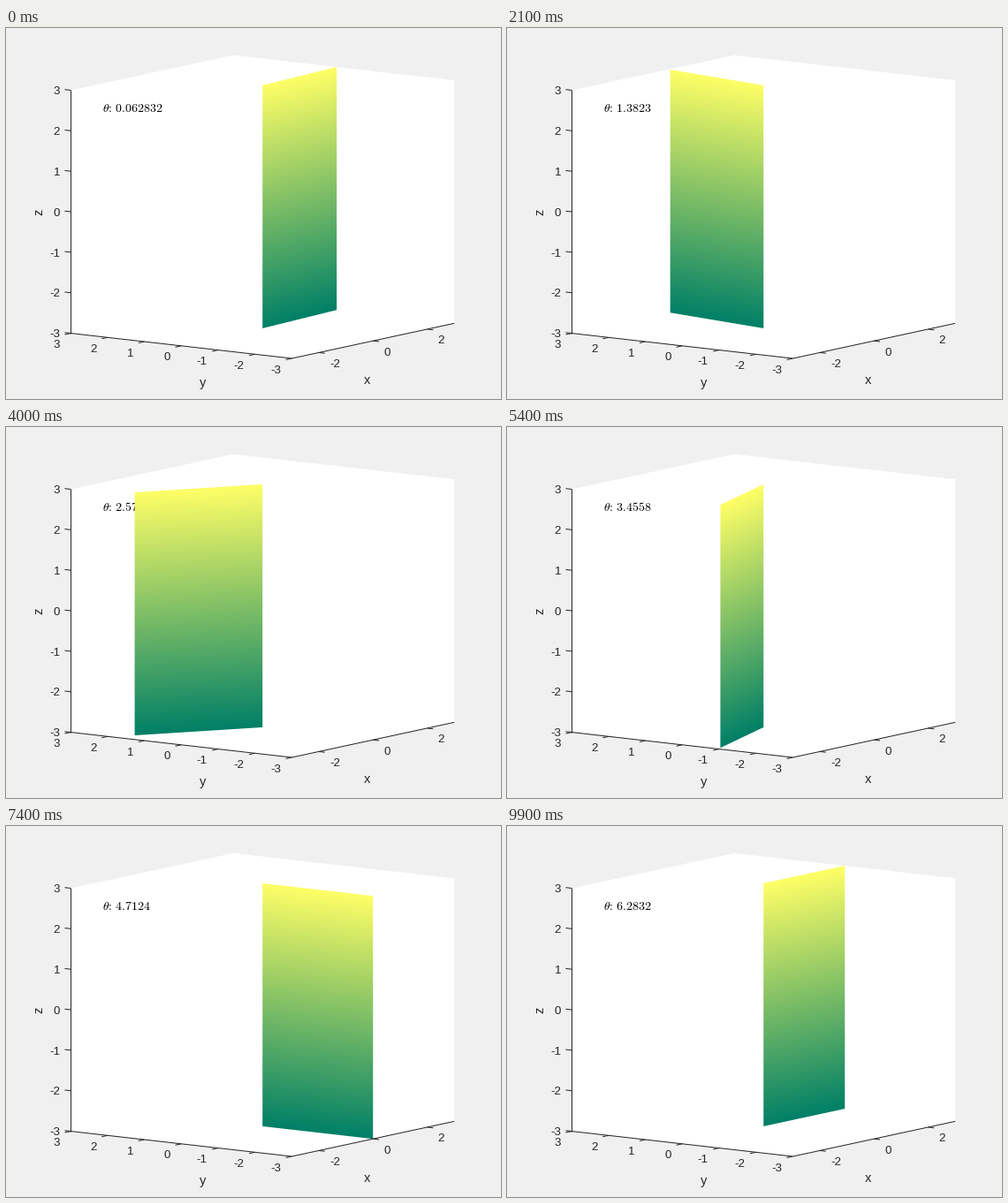
Write a matplotlib script that moves like this. It is 560x420 px and loops after 10 s.

```python
import matplotlib.pyplot as plt
import numpy as np
from matplotlib.animation import FuncAnimation

W, H, DPI = 560, 420, 100
FRAMES = 100
R = 3
INK = "#262626"

# Orthographic projection: screen vectors of the data axes
ORIGIN = np.array([290.2, 202.4])
UX = np.array([30.65, -6.62])
UY = np.array([-41.67, -4.75])
UZ = np.array([0, -45.85])


def project(x, y, z):
    return ORIGIN + x * UX + y * UY + z * UZ


def px(size):
    return size * 72 / DPI


fig = plt.figure(figsize=(W / DPI, H / DPI), dpi=DPI, facecolor="#f0f0f0")
ax = fig.add_axes([0, 0, 1, 1])
ax.set_xlim(0, W)
ax.set_ylim(H, 0)
ax.axis("off")


def line(a, b):
    ax.plot([a[0], b[0]], [a[1], b[1]], color=INK, lw=px(1),
            solid_capstyle="butt", zorder=4)


def tick(p, direction):
    line(p, p + 6.8 * direction / np.hypot(*direction))


def label(x, y, s, ha, size=13.33, **kw):
    ax.text(x, y, s, ha=ha, va="baseline", color=INK, fontsize=px(size),
            family="Liberation Sans", zorder=4, **kw)


def draw_axes():
    outline = [(-R, R, R), (R, R, R), (R, -R, R),
               (R, -R, -R), (-R, -R, -R), (-R, R, -R)]
    ax.fill(*np.transpose([project(*p) for p in outline]), color="white",
            lw=0, zorder=0)
    left, front, right = (project(-R, R, -R), project(-R, -R, -R),
                          project(R, -R, -R))
    line(project(-R, R, R), left)
    line(left, front)
    line(front, right)

    for v in range(-R, R + 1):
        p = project(-R, R, v)
        tick(p, UY)
        label(61, p[1] + 4.7, str(v), "right")
        p = project(-R, v, -R)
        tick(p, -UX)
        label(p[0] - 12.3, p[1] + 16.6, str(v), "right")
    for v in (-2, 0, 2):
        p = project(v, -R, -R)
        tick(p, -UY)
        label(p[0] + 12.3, p[1] + 16.4, str(v), "left")

    label(408.5, 403, "x", "center", 14.67)
    label(222.5, 406, "y", "center", 14.67)
    label(41, 208, "z", "center", 14.67, rotation=90, rotation_mode="anchor")


def sheet(theta):
    """RGBA picture of the half plane at angle theta, with soft edges."""
    hinge = project(0, 0, R)
    tip = project(R * np.cos(theta), R * np.sin(theta), R)
    (x0, y0), (x1, y1) = sorted([tuple(hinge), tuple(tip)])
    cols = np.arange(W)
    rows = np.arange(H)[:, None] + 0.5
    across = np.clip((cols + 0.5 - x0) / (x1 - x0), 0, 1)
    top = y0 + across * (y1 - y0)
    height = -2 * R * UZ[1]

    t = np.clip(1 - (rows - top) / height, 0, 1)
    cover_x = np.clip(np.minimum(cols + 1, x1) - np.maximum(cols, x0), 0, 1)
    cover_y = np.clip(np.minimum(rows - top, top + height - rows) + 0.5, 0, 1)
    # the "summer" colour ramp
    return np.dstack([t, 0.5 + t / 2, np.full_like(t, 0.4), cover_x * cover_y])


draw_axes()
plane = ax.imshow(np.zeros((H, W, 4)), extent=(0, W, H, 0), aspect="auto",
                  interpolation="nearest", zorder=2)
readout = ax.text(108.8, 95.3, "", color="black", fontsize=px(13.9),
                  math_fontfamily="cm", ha="left", va="baseline")


def update(i):
    theta = 2 * np.pi * (i + 1) / FRAMES
    plane.set_data(sheet(theta))
    readout.set_text(r"$\theta\hspace{-0.2}\mathrm{:}\hspace{0.18}"
                     rf"\mathrm{{{theta:.5g}}}$")
    # the sheet passes in front of the text on the near side
    readout.set_zorder(1 if np.radians(138) < theta < np.pi * 1.5 else 3)
    return plane, readout


anim = FuncAnimation(fig, update, frames=FRAMES, interval=100, repeat=True,
                     repeat_delay=0, blit=False)
plt.show()
```
